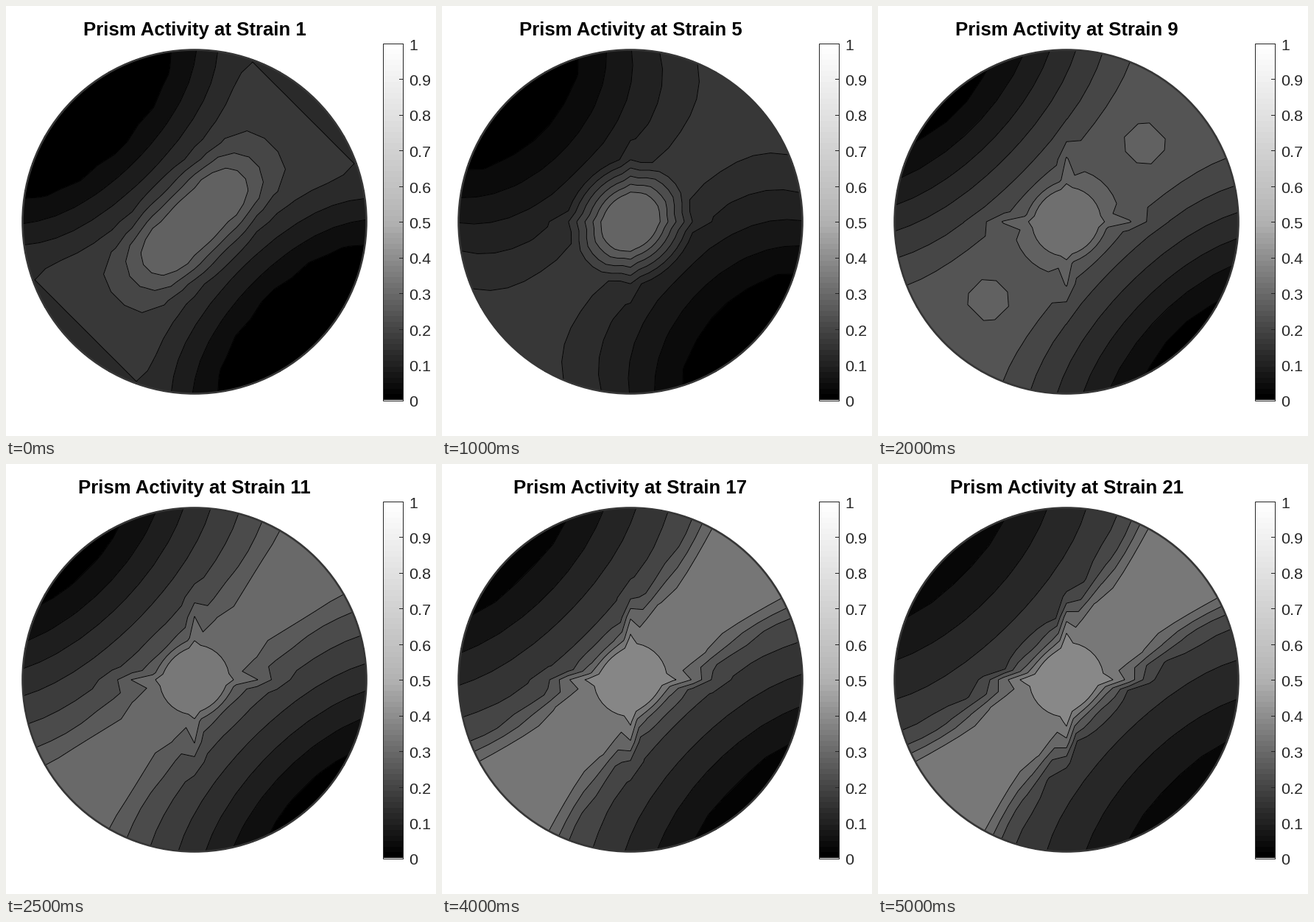
Write a matplotlib script that moves like this. It is 584 by 584 pixels and loops after 5250 ms.

```python
import numpy as np
import matplotlib.pyplot as plt
from matplotlib.animation import FuncAnimation
from matplotlib.patches import Circle, Rectangle

SIZE, DPI = 584, 100
CX, CY, R = 256, 293, 234
STRAINS = 21
INK = "#262626"

plt.rcParams["font.family"] = "Liberation Sans"


def pt(px):
    return px * 72 / DPI


def tone(v):
    """Gray map: black, light gray at one half, white."""
    return np.interp(v, [0, .5, 1], [0, .7, 1])


# Equal-area polar mesh, 10 degrees in both tilt and azimuth.
tilt, azim = np.meshgrid(np.arange(0, 91, 10), np.arange(0, 361, 10),
                         indexing="ij")
r = R * np.sqrt(2) * np.sin(np.radians(tilt) / 2)
X = CX + r * np.cos(np.radians(azim))
Y = CY - r * np.sin(np.radians(azim))

# Distances along and across the bright diagonal; the pattern is symmetric.
fold = np.abs((azim - 45 + 90) % 180 - 90)
along = r * np.cos(np.radians(fold))
across = r * np.sin(np.radians(fold))

# How the pattern's parameters develop at a few strains.
KEY_STRAINS = [1, 5, 9, 14, 21]
PARAMS = dict(
    step=[.039, .031, .039, .0465, .045],  # value between contours
    floor=[0, 0, 0, 0, .02],               # value of the darkest area
    top=[8, 9, 8, 8, 8],                   # number of contours
    ridge=[5.6, 5.4, 6.85, 7.4, 7.5],      # rank of the diagonal band
    fall=[2, 0, 0, 0, 0],                  # loss of the band towards the rim
    edge=[40, 28, 60, 66, 68],             # foot of the band
    foot=[5, 5, 6, 5, 3.9],                # rank at the foot
    dark=[140, 168, 210, 200, 198],        # start of the darkest area
    flare=[.58, .8, .42, .42, .42],        # widening towards the rim
    core=[2.2, 5, 3, 2.6, 2.6],            # centre peak, length and width
    length=[118, 62, 47, 40, 40],
    width=[55, 62, 47, 40, 40],
    spike=[0, .6, 1.1, 1.5, 1.6],          # star points on the axes
    lobe=[.45, 0, .35, 0, 0],              # twin bumps on the diagonal
    lobe_at=[62, 62, 150, 150, 150],
)


def bell(x):
    return np.exp(-x ** 2)


def pattern(p):
    """Field on the mesh, in contour ranks."""
    t2 = (along / R) ** 2
    v = across * (1 - p["flare"] * t2)
    slope = np.interp(v, [.58 * p["edge"], p["edge"], p["dark"], p["dark"] + 60],
                      [p["ridge"], p["foot"], 1, 0])
    band = np.minimum(slope, p["ridge"] - p["fall"] * t2)
    peak = bell((along / p["length"]) ** 2 + (across / p["width"]) ** 2)
    star = bell((fold - 45) / 4) * bell((r - 80) / 30)
    lobes = bell((along - p["lobe_at"]) / 30) * bell(across / 30)
    return band + p["core"] * peak + p["spike"] * star + p["lobe"] * lobes


fig = plt.figure(figsize=(SIZE / DPI, SIZE / DPI), dpi=DPI, facecolor="white")
ax = fig.add_axes([0, 0, 1, 1])


def draw_colorbar(x0=511.5, x1=538.5, top=50.5, bottom=535.5):
    ramp = tone(np.linspace(1, 0, 64))[:, None]
    ax.imshow(ramp, cmap="gray", vmin=0, vmax=1, aspect="auto",
              extent=(x0, x1, bottom, top), interpolation="nearest")
    ax.add_patch(Rectangle((x0, top), x1 - x0, bottom - top, fill=False,
                           ec=INK, lw=pt(1)))
    for i in range(11):
        y = bottom - (bottom - top) * i / 10
        ax.plot([x1 - 5, x1], [y, y], color=INK, lw=pt(1))
        ax.text(547, y + 9, f"{i / 10:g}", size=pt(21.5), color=INK,
                va="baseline")


draw_colorbar()
ax.add_patch(Circle((CX, CY), R - .5, fill=False, ec="#363636", lw=pt(2.6),
                    zorder=5))
title = ax.text(CX, 40, "", size=pt(25.7), weight="bold", color="black",
                ha="center", va="baseline")
ax.set_xlim(0, SIZE)
ax.set_ylim(SIZE, 0)
ax.axis("off")

contours = []


def update(i):
    while contours:
        contours.pop().remove()
    strain = i + 1
    p = {name: np.interp(strain, KEY_STRAINS, row)
         for name, row in PARAMS.items()}
    ranks = pattern(p)
    count = round(p["top"])
    lines = list(range(1, count + 1))
    shades = [str(tone(p["floor"] + p["step"] * k)) for k in range(count + 1)]
    contours.append(ax.contourf(X, Y, ranks, levels=[-9, *lines, 99],
                                colors=shades, zorder=2))
    contours.append(ax.contour(X, Y, ranks, levels=lines, colors="black",
                               linewidths=pt(.9), zorder=3))
    title.set_text(f"Prism Activity at Strain {strain}")
    return [title]


anim = FuncAnimation(fig, update, frames=STRAINS, interval=250,
                     init_func=lambda: update(0), repeat=True, repeat_delay=0)
plt.show()
```
